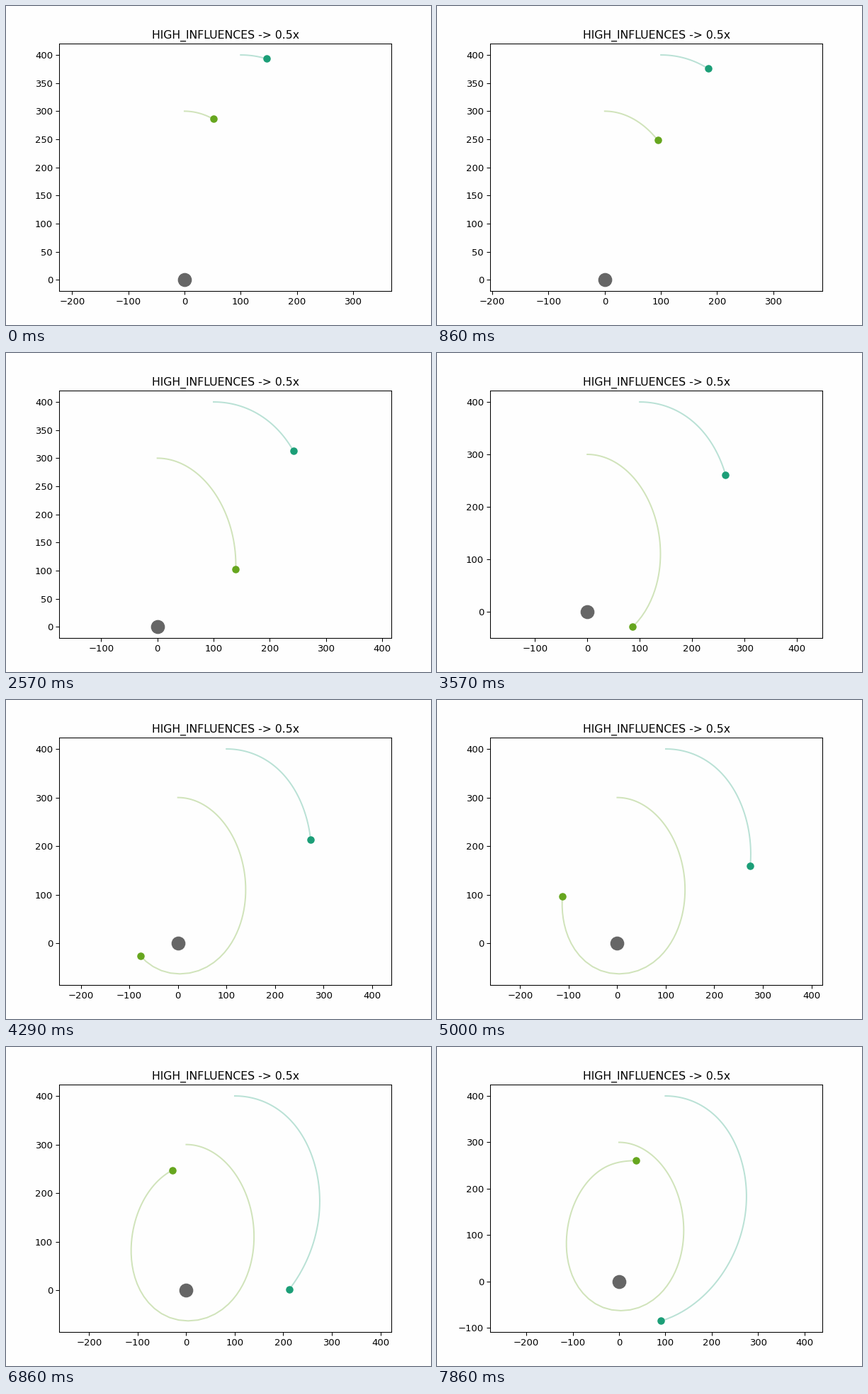
Animation, 600 px wide and 450 px high, one loop 8 s. Source, as a matplotlib script:

```python
import numpy as np
import matplotlib.pyplot as plt
from matplotlib.animation import FuncAnimation

W, H, DPI = 600, 450, 94.5
LOOP, TICK = 8000, 40           # ms
RATE, SUB = 7, 2                # poses per second, path steps per pose
LAST = LOOP * RATE // 1000 - 1
START = -6.5                    # launch time, in poses
STEPS = np.arange(START, LAST + 0.25, 1 / SUB)

TEAL, GREEN, GREY = "#1b9e77", "#66a61e", "#666666"
BACK = "#fefefe"

# Key points of each orbit: (time in poses, x, y)
OUTER = [(START, 100, 400), (11, 212, 353), (25, 264, 261),
         (35, 274, 159), (48, 212, 1.5), (LAST, 91, -85)]
INNER = [(START, 0, 300), (11, 123, 198), (25, 86.5, -29), (27.5, 4, -63),
         (31, -95, 0), (35, -113, 97), (48, -28.5, 247), (LAST, 36, 260.5)]


def spline(x, y, slope, q):
    """Cubic spline with a given first slope and a natural end."""
    n = len(x)
    h = np.diff(x)
    d = np.diff(y) / h
    a, b = np.zeros((n, n)), np.zeros(n)
    a[0, 0], b[0] = 1, slope
    for i in range(1, n - 1):
        a[i, i - 1:i + 2] = 1 / h[i - 1], 2 / h[i - 1] + 2 / h[i], 1 / h[i]
        b[i] = 3 * (d[i - 1] / h[i - 1] + d[i] / h[i])
    a[-1, -2:], b[-1] = (1, 2), 3 * d[-1]
    m = np.linalg.solve(a, b)
    i = np.clip(np.searchsorted(x, q, "right") - 1, 0, n - 2)
    t = (q - x[i]) / h[i]
    return ((1 - t) ** 2 * (1 + 2 * t) * y[i] + t ** 2 * (3 - 2 * t) * y[i + 1]
            + h[i] * t * (1 - t) * ((1 - t) * m[i] - t * m[i + 1]))


def orbit(keys):
    """Smooth 1/r over the angle, timed by Kepler's equal areas."""
    time, x, y = np.array(keys, float).T
    angle, radius = np.unwrap(np.arctan2(x, y)), np.hypot(x, y)
    level = -x[0] / (y[0] * radius[0])      # slope of 1/r for a level launch
    fine = np.linspace(angle[0], angle[-1], 4000)
    r = 1 / spline(angle, 1 / radius, level, fine)
    area = np.concatenate([[0], np.cumsum(r[1:] ** 2 + r[:-1] ** 2)])
    swept = np.interp(STEPS, time, np.interp(angle, fine, area))
    a = np.interp(swept, area, fine)
    rad = np.interp(a, fine, r)
    return rad * np.sin(a), rad * np.cos(a)


fig = plt.figure(figsize=(W / DPI, H / DPI), dpi=DPI, facecolor=BACK)
LEFT, BOTTOM, AW, AH = 75.2, 47.8, 469.2, 349.0
ax = fig.add_axes([LEFT / W, BOTTOM / H, AW / W, AH / H], facecolor=BACK)
ax.set_title("HIGH_INFLUENCES -> 0.5x")

bodies = []
for keys, color in ((OUTER, TEAL), (INNER, GREEN)):
    trail, = ax.plot([], [], color=color, alpha=0.3)
    dot, = ax.plot([], [], "o", color=color, ms=7, zorder=3)
    bodies.append((orbit(keys), trail, dot))
ax.plot([0], [0], "o", color=GREY, ms=14, zorder=3)


def fit_view(xs, ys):
    """Equal scale on both axes, with 5% room above and below."""
    low, high = min(ys), max(ys)
    pad = 0.05 * (high - low)
    half = (high - low + 2 * pad) * AW / AH / 2
    mid = (min(xs) + max(xs)) / 2
    ax.set_xlim(mid - half, mid + half)
    ax.set_ylim(low - pad, high + pad)


def draw(tick):
    # a pose shows from the tick in which it falls due
    pose = ((tick + 1) * TICK - 1) * RATE // 1000
    n = int((pose - START) * SUB) + 1
    xs, ys = [0], [0]
    for (x, y), trail, dot in bodies:
        trail.set_data(x[:n], y[:n])
        dot.set_data(x[n - 1:n], y[n - 1:n])
        xs.extend(x[:n])
        ys.extend(y[:n])
    fit_view(xs, ys)
    return []


anim = FuncAnimation(fig, draw, frames=LOOP // TICK, init_func=lambda: draw(0),
                     interval=TICK, repeat=True, repeat_delay=0)
plt.show()
```
